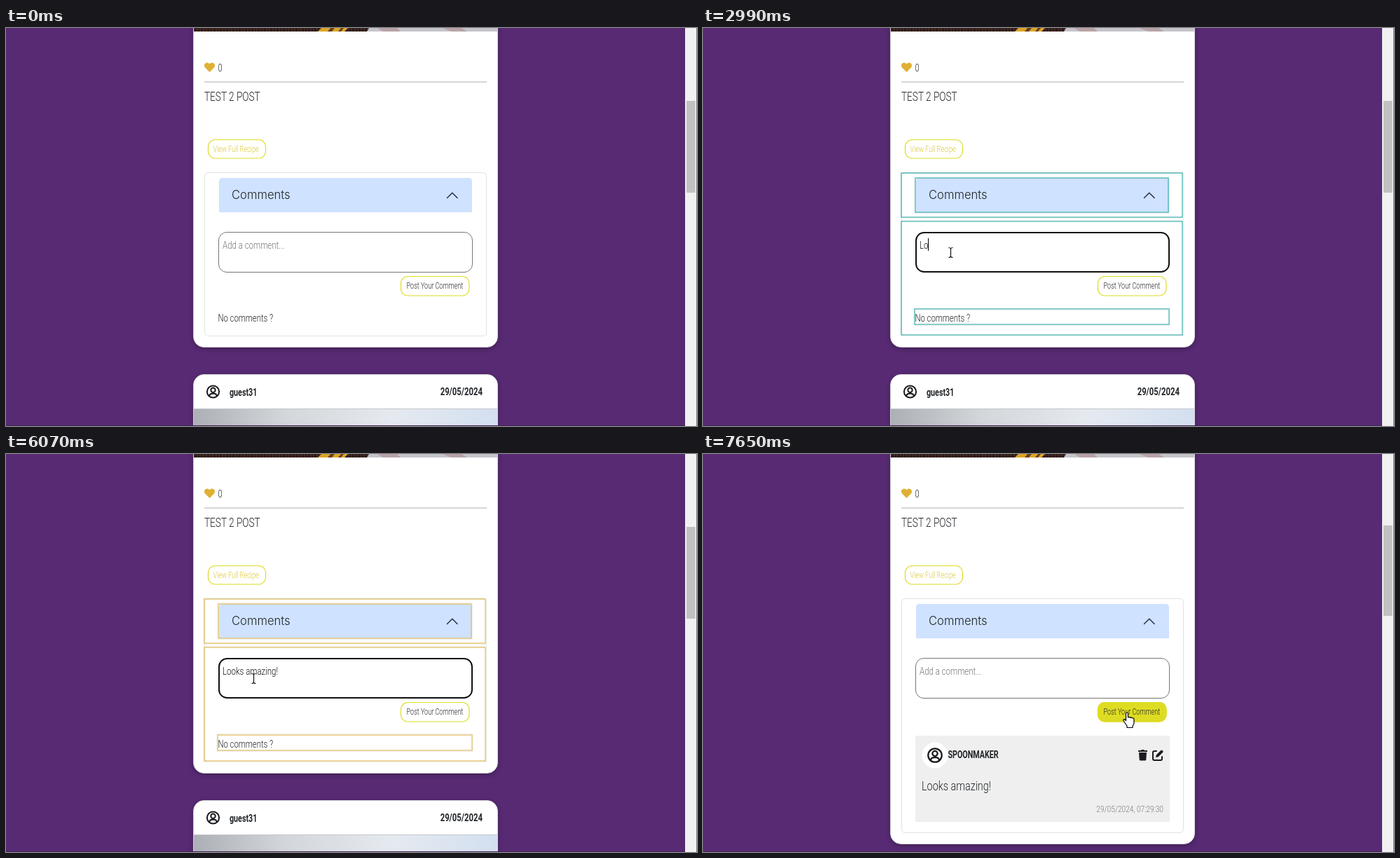
Animation, 986 px wide and 568 px high, one loop 8000 ms. Source, as an HTML page:

```html
<!DOCTYPE html>
<html lang="en">
<head>
<meta charset="utf-8">
<style>
html, body { margin: 0; width: 100%; height: 100%; overflow: hidden; background: #572a73; }
svg { display: block; }
text { font-family: Roboto, "Liberation Sans", sans-serif; font-weight: 350; fill: #212529; white-space: pre; }
.bold { font-weight: 700; }
.card { fill: #fff; stroke: #d3d0d6; filter: drop-shadow(0 2px 3px #0004); }
.line { fill: none; stroke: #dee2e6; }
.icon { fill: none; stroke: #1b1b1f; stroke-width: 2; stroke-linecap: round; stroke-linejoin: round; }
.pill { fill: #fff; stroke: #dedc22; stroke-width: 1.2; }
</style>
</head>
<body>
<svg width="986" height="568" viewBox="0 0 986 568">
  <defs>
    <linearGradient id="sky">
      <stop offset="0" stop-color="#acafb5"/>
      <stop offset=".3" stop-color="#d3d6da"/>
      <stop offset=".65" stop-color="#e5eaf0"/>
      <stop offset="1" stop-color="#d3dff0"/>
    </linearGradient>
    <pattern id="wood" width="9" height="6" patternUnits="userSpaceOnUse">
      <path d="M0 0h9v6H0z" fill="#2b1a18"/>
      <path d="M3 0v6M7 0v6" stroke="#58382c"/>
    </pattern>
    <g id="user" class="icon">
      <circle r="8.6"/>
      <circle cy="-2.2" r="3.2"/>
      <path d="M-5.6 6.3Q-4.6 2.8-1.5 2.8h3Q4.6 2.8 5.6 6.3"/>
    </g>
  </defs>

  <rect width="986" height="568" fill="#572a73"/>
  <rect id="card" class="card" x="267.5" y="-40" width="434" rx="15"/>
  <path d="M268 0h250v5H268z" fill="url(#wood)"/>
  <path d="M450 0h38l-5 5h-38z" fill="#dda526"/>
  <path d="M463 0h6l-4 5h-6zM478 0h4l-4 5h-4z" fill="#66401d"/>
  <path d="M518 0h183v5H515z" fill="#c6c4cb"/>
  <path d="M530 0h28l5 5h-25zM622 0h28l8 5h-22z" fill="#b7a3a7"/>

  <path d="M290.5 63l-6.2-6.2c-4-4.4 1.7-10.4 6.2-5.5c4.5-4.9 10.2 1.1 6.2 5.5z" fill="#dfb033"/>
  <path d="M283 77h403" stroke="#c8c8c8" stroke-width="1.3"/>
  <rect class="pill" x="288.5" y="159.5" width="82" height="26.5" rx="10"/>

  <rect id="panel" class="line" x="283.5" y="206.5" width="402" rx="5"/>
  <path d="M304 263v-44q0-5 5-5h351q5 0 5 5v44z" fill="#cfe2ff"/>
  <path d="M629.5 242.5l7.3-7.300l7.300 7.300" class="icon" style="stroke-width:1.4;stroke:#212a3c"/>
  <text x="322" y="244" style="font:300 16.6px Inter,sans-serif">Comments</text>
  <rect id="field" rx="11.5" fill="#fff"/>
  <path id="squiggle" fill="none" stroke="#e0342f"/>
  <rect class="pill" x="563.5" y="354.5" width="97.5" height="27.5" rx="10"/>
  <rect id="hover" x="563" y="354" width="98.5" height="28.5" rx="10" fill="#dedc22"/>
  <g id="words"></g>

  <g id="empty"></g>
  <g id="nextCard">
    <rect class="card" x="267.5" y="494.5" width="434" height="120" rx="15"/>
    <path d="M268 543.5h433v40H268z" fill="url(#sky)"/>
    <path d="M268 543.5h433" stroke="#c4c6ca"/>
    <use href="#user" x="295.5" y="519"/>
  </g>
  <g id="posted">
    <path d="M303 402h363v123H303z" fill="#efefef"/>
    <circle cx="331" cy="430" r="18.5" fill="#fff"/>
    <use href="#user" transform="translate(331 430) scale(1.13)"/>
    <path d="M621 423h4l1-1h3l1 1h4v2h-13zM622 426h11l-.7 10q-.1 1.5-1.5 1.5h-6.6q-1.4 0-1.5-1.5z" fill="#1b1b1f"/>
    <path d="M647 424h-3q-2 0-2 2v9q0 2 2 2h9q2 0 2-2v-3" class="icon"/>
    <path d="M646 433l.8-3.6l6.5-6.5q1-1 2 0l.9.9q1 1 0 2l-6.5 6.5z" fill="#1b1b1f"/>
  </g>
  <path id="caret" stroke="#000"/>
  <g id="flash" fill="none"></g>

  <path d="M969 0h16v568h-16z" fill="#f1f1f1"/>
  <path d="M985.5 0v568" stroke="#7c7c7c"/>
  <rect id="thumb" x="971" width="12.5" fill="#c1c1c1"/>
  <path d="M0 567.5h969" stroke="#452159"/>
  <g id="cursor" stroke-linejoin="round">
    <path id="beam" d="M-3-7q2.5 0 3 1.5q.5-1.5 3-1.5M0-6V6M-3 7q2.5 0 3-1.5q.5 1.5 3 1.5" fill="none" stroke="#111" stroke-width="1.2"/>
    <path id="arrow" d="M0 0v16l3.7-3.6l2.6 6l2.4-1l-2.6-5.9h5.2z" fill="#fff" stroke="#000"/>
    <path id="hand" d="M-3-8.5q1.5-2.5 3 0v6q2-1.5 3 .5q2-1.5 3 .5q2.5-1 2.5 2V5q0 3-2 4.5V12h-8V9.5L-6 3q-1.5-3 1-3l2 2z" fill="#fff" stroke="#000" stroke-width="1.2"/>
  </g>
</svg>
<script>
const $ = id => document.getElementById(id);
const NS = 'http://www.w3.org/2000/svg';
const LOOP = 8000, FOCUS = 810, BLUR = 7110, POST = 7450;
const CONDENSED = .765;   // one narrow face for the whole page
const MESSAGE = 'Looks amazing!';
const KEYS = [2600, 2990, 3070, 3270, 3600, 3730, 4260, 4460, 4590, 4790, 4990, 5090, 5190, 5540];
const HEAT = ['#37afa9', '#63b19e', '#80b393', '#97b488', '#abb67d', '#beb771', '#cfb965', '#dfba57'];

function add(parent, tag, attrs) {
  const el = document.createElementNS(NS, tag);
  set(el, attrs);
  return parent.appendChild(el);
}
function set(el, attrs) {
  for (const name in attrs) el.setAttribute(name, attrs[name]);
}
function show(el, on) {
  el.style.display = on ? '' : 'none';
}
function label(parent, x, y, size, words, more = {}) {
  const el = add($(parent), 'text', {
    transform: `translate(${x} ${y}) scale(${CONDENSED} 1)`, 'font-size': size, ...more
  });
  el.textContent = words;
  return el;
}

const bold = { class: 'bold' };
const ended = { 'text-anchor': 'end' };
label('words', 302.5, 61.5, 14.5, '0');
label('words', 283, 104, 17.8, 'TEST 2 POST');
label('words', 295.5, 177, 12, 'View Full Recipe', { style: 'fill:#dac638' });
label('words', 571.5, 372, 11.9, 'Post Your Comment');
const input = label('words', 309, 314.5, 15, '');
label('empty', 302.5, 418.5, 14.8, 'No comments ?');
label('nextCard', 319, 524.5, 14, 'guest31', bold);
label('nextCard', 680, 523.5, 14.8, '29/05/2024', { ...bold, ...ended });
label('posted', 349.5, 434, 14, 'SPOONMAKER', bold);
label('posted', 312, 480, 18.8, MESSAGE);
label('posted', 657, 511, 13.3, '29/05/2024, 07:29:30', { ...ended, style: 'fill:#7b7b7b' });

let zigzag = 'M343 319';
for (let x = 345, i = 0; x < 387; x += 2, i++) zigzag += `L${x} ${i % 2 ? 319 : 316.5}`;
set($('squiggle'), { d: zigzag });

const frames = Array.from({ length: 4 }, () => ({
  halo: add($('flash'), 'rect', { stroke: '#f0f0f0' }),
  edge: add($('flash'), 'rect', { 'stroke-width': 1.2 })
}));

// Lines sit on whole pixels, so each is softly spread over two.
function outline(frame, x, y, right, bottom, color) {
  const width = right - x, height = bottom - y;
  set(frame.halo, { x: x - 1, y: y - 1.5, width: width + 2.3, height: height + 3 });
  set(frame.edge, { x, y, width, height, stroke: color });
}

// Each key extends the highlight and warms its colour until it expires.
function heatAt(t) {
  if (t >= POST) return t < 7650 ? HEAT[0] : null;
  let expiry = 0, count = 0;
  for (const key of KEYS) {
    if (key > t) break;
    if (key > expiry) { expiry = key; count = 0; }
    expiry += 240;
    count++;
  }
  return t < expiry ? HEAT[Math.min(count, HEAT.length) - 1] : null;
}

function glide(t, start, end) {
  const p = Math.min(1, Math.max(0, (t - start) / (end - start)));
  return p * p * (3 - 2 * p);
}
const within = (x, y, l, t, r, b) => x > l && x < r && y > t && y < b;

function drawCursor(t) {
  const into = glide(t, 230, FOCUS), out = glide(t, 6120, 6800);
  const x = 880 - 526.5 * into + 253 * out;
  const y = 574 - 253.5 * into + 58 * out;
  const beam = within(x, y, 303, 291, 666, 349);
  const hand = within(x, y, 563, 354, 661, 382);
  set($('cursor'), { transform: `translate(${x} ${y})` });
  show($('cursor'), t >= 330);
  show($('beam'), beam);
  show($('hand'), hand);
  show($('arrow'), !beam && !hand);
  $('hover').style.opacity = t > 6000 ? Math.min(1, Math.max(0, (t - 6570) / 150)) : 0;
}

function draw(t) {
  const posted = t >= POST, focused = t >= FOCUS && t < BLUR;
  const grow = posted ? 101 : 0;
  set($('card'), { height: 495.5 + grow });
  set($('panel'), { height: 233 + grow });
  set($('nextCard'), { transform: `translate(0 ${grow})` });
  set($('thumb'), posted ? { y: 102, height: 129 } : { y: 104, height: 131 });
  show($('posted'), posted);
  show($('empty'), !posted);
  show($('squiggle'), t >= BLUR && !posted);

  // The border grows inward from a fixed outer edge.
  const border = focused ? 2 : 1;
  set($('field'), {
    x: 303 + border / 2, y: 291 + border / 2, width: 363 - border, height: 58 - border,
    stroke: focused ? '#101010' : '#767676', 'stroke-width': border
  });

  const typed = posted ? 0 : KEYS.filter(key => key <= t).length;
  const words = typed ? MESSAGE.slice(0, typed) : 'Add a comment...';
  if (input.textContent !== words) input.textContent = words;
  input.style.fill = typed ? '#111' : '#757575';

  const lastKey = typed ? KEYS[typed - 1] : FOCUS;
  const caretX = Math.floor(309 + (typed ? input.getComputedTextLength() * CONDENSED : 0)) + .5;
  set($('caret'), { d: `M${caretX} 300v18` });
  show($('caret'), focused && Math.floor((t - lastKey) / 530) % 2 === 0);

  const color = heatAt(t);
  show($('flash'), color);
  if (color) {
    outline(frames[0], 283, 207, 684, 270, color);
    outline(frames[1], 303, 214, 664, 263, color);
    outline(frames[2], 283, 276, 684, 438 + grow, color);
    outline(frames[3], 302, 401, 665, posted ? 525 : 423, color);
  }
  drawCursor(t);
}

const start = performance.now();
function tick() {
  draw((performance.now() - start) % LOOP);
  requestAnimationFrame(tick);
}
tick();
</script>
</body>
</html>
```
